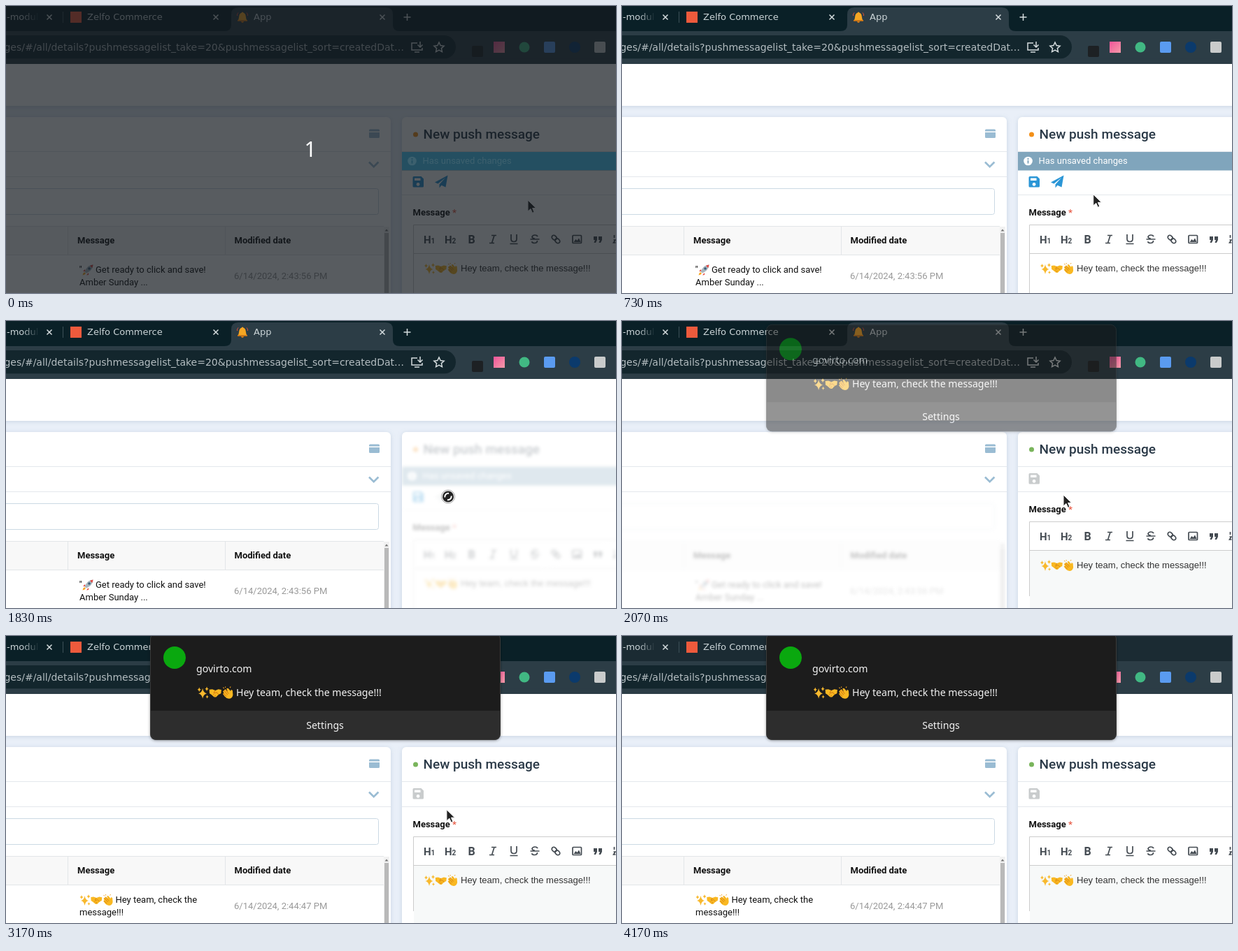
Recreate the animation shown at these times as an HTML page. Size 872 by 411 pixels, loop 4210 ms.

```html
<!DOCTYPE html>
<html lang="en">
<head>
<meta charset="utf-8">
<title>Push message</title>
<style>
  html, body { margin: 0; width: 100%; height: 100%; overflow: hidden; background: #e9eff8; }
  svg { display: block; width: 872px; height: 411px; }
  text { white-space: pre; }
  .tab { font: 13px "DejaVu Sans", sans-serif; fill: #cbd4d7; }
  .url { font: 14px "DejaVu Sans", sans-serif; fill: #b4bdc1; }
  .ui { font: 13px Roboto, sans-serif; fill: #111; }
  .bold { font: 700 13px Roboto, sans-serif; fill: #111; }
  .title { font: 500 19px Roboto, sans-serif; fill: #2b3a48; }
  .edit { font: 13px "Liberation Sans", Arial, sans-serif; fill: #333; }
  .note { font: 14.1px "Noto Sans", sans-serif; fill: #f2f2f2; }
  .tool { font: 700 15px Roboto, sans-serif; fill: #444b52; }
  .sub { font-size: 10px; }
  .x { fill: none; stroke: #d5dcde; stroke-width: 1.5; }
  .line { stroke: #e4e8ec; fill: none; }
  .ico { fill: none; stroke: #444b52; stroke-width: 1.7; }
</style>
</head>
<body>
<svg viewBox="0 0 872 411">
  <defs>
    <linearGradient id="fade" gradientUnits="userSpaceOnUse" x1="24" y1="0" x2="47" y2="0">
      <stop stop-color="#cbd4d7"/><stop offset="1" stop-color="#cbd4d7" stop-opacity="0"/>
    </linearGradient>
    <linearGradient id="pink" x2="1" y2="1">
      <stop stop-color="#f0559a"/><stop offset="1" stop-color="#f49aa8"/>
    </linearGradient>
    <filter id="soft" x="-10%" y="-10%" width="120%" height="125%">
      <feDropShadow dx="0" dy="1" stdDeviation="3" flood-color="#7d94b0" flood-opacity=".3"/>
    </filter>
    <filter id="drop" x="-5%" y="-10%" width="110%" height="125%">
      <feDropShadow dx="0" dy="1" stdDeviation="2" flood-opacity=".45"/>
    </filter>
    <clipPath id="rightClip"><rect x="566" y="159" width="320" height="270" rx="6"/></clipPath>
    <clipPath id="leftClip"><rect x="-10" y="245" width="559" height="180"/></clipPath>
    <path id="x" class="x" d="M-3.5-3.5l7 7m0-7l-7 7"/>
    <g id="sparkles" fill="#f8b92e">
      <path d="M7.5 2Q8.5 8 13 9Q8.5 10 7.5 16Q6.500 10 2 9Q6.500 8 7.500 2Z"/>
      <path d="M3 1Q3.400 3.600 5.500 4Q3.400 4.400 3 7Q2.600 4.400 .5 4Q2.600 3.600 3 1ZM13 0Q13.400 2.600 15.500 3Q13.400 3.400 13 6Q12.600 3.400 10.500 3Q12.600 2.600 13 0ZM13.500 11Q13.800 13.200 15.500 13.500Q13.800 13.800 13.500 16Q13.200 13.800 11.500 13.500Q13.200 13.200 13.500 11Z"/>
    </g>
    <g id="shake">
      <path fill="#f9b822" d="M0 4L4 3.500L8 5L12 3.500L16 4.200L15.500 9L12.500 10.500L9 14L6.500 13.800L2.500 10.500L.3 9Z"/>
      <path fill="none" stroke="#d98412" d="M8 5L6 8.200Q8 9 9.500 7.500L12.500 10.500M5 11l1.500-1.500M7 13l1.500-2"/>
    </g>
    <g id="clap">
      <path fill="#f9b822" d="M3 5L5 3.500L8 6.500L6.500 2.500L8.500 2L12 6L12.500 4L14.500 5L15 11Q14 16 9.500 16Q6.500 16 4 13L1.500 9.500L3 8.500L1.800 6.500Z"/>
      <path fill="none" stroke="#d98412" d="M3 5.200L8 11M5 3.800L9.500 9.500M2.500 9L6.500 13"/>
      <path stroke="#f0a020" d="M2 1l1.300 1.500M5 0v1.500M11 1.500l1-1.500"/>
    </g>
    <g id="trio">
      <use href="#sparkles"/><use href="#shake" x="16.300"/><use href="#clap" x="32.600"/>
    </g>
    <g id="rocket">
      <path fill="#e5433d" d="M4 7L1 10L4.500 10ZM9 12L9 15L6 15.500Z"/>
      <path fill="#a9b7bf" d="M15.500 .5Q9 1 5.500 6.500L3.500 10.500L5.800 12.500L9.500 10.500Q15 7 15.500 .5Z"/>
      <path fill="#e5433d" d="M15.500 .5L11 1.800L14.200 5Z"/>
      <circle cx="10" cy="6" r="1.800" fill="#3c5c78"/>
      <path fill="#f9a825" d="M3 11Q.8 12.500 .5 15.500Q3.500 15.200 5 13Z"/>
    </g>
    <g id="bell" stroke-linejoin="round">
      <path fill="#f6a623" d="M7 1.500Q8-.5 9.200 1.500Q12.500 2.500 12.800 7Q13 11 15 13H1Q3 11 3.200 7Q3.500 2.500 7 1.500Z"/>
      <path fill="#d97c14" d="M1 12h14v1.800H1ZM6 14h4q-.3 2-2 2t-2-2Z"/>
      <path fill="none" stroke="#e04f3d" d="M.5 6Q0 3.500 2 1.500M15.500 6Q16 3.500 14 1.500"/>
    </g>
  </defs>

  <!-- browser -->
  <rect id="strip" width="872" height="37" fill="#0a2027"/>
  <rect id="hover" x="-20" y="2" width="102" height="31" rx="8" fill="#20343c"/>
  <path d="M312 36Q322 36 322 27V12Q322 2 332 2H543Q553 2 553 12V27Q553 36 563 36Z" fill="#2c3d46"/>
  <rect y="36" width="872" height="47" fill="#2c3d46"/>
  <rect x="-40" y="42" width="683" height="33.500" rx="16.700" fill="#13262d"/>
  <text class="tab" x="1" y="20" style="fill:url(#fade)">-modul</text>
  <use href="#x" x="62" y="16"/><use href="#x" x="300" y="16"/><use href="#x" x="538" y="16"/>
  <path id="divider" d="M81.500 8v16" stroke="#3c5058"/>
  <rect x="92" y="8" width="16" height="16" fill="#ee5a3c"/>
  <text class="tab" x="116" y="20">Zelfo Commerce</text>
  <use href="#bell" x="330" y="8"/>
  <text class="tab" x="354" y="20">App</text>
  <path class="x" d="M568.500 16h10m-5-5v10"/>
  <text class="url" x="-2.600" y="64">ges/#/all/details?pushmessagelist_take=20&amp;pushmessagelist_sort=createdDat…</text>
  <path class="x" d="M588 53h-8v10h15v-3M584 66h7M592 51v8m-3.500-3.500l3.500 3.500l3.500-3.500"/>
  <path class="x" d="M619 52l2.100 4.600l5 .6l-3.700 3.400l1 5l-4.400-2.500l-4.400 2.500l1-5l-3.700-3.400l5-.6Z"/>
  <rect x="666" y="57" width="16" height="16" rx="2" fill="#1d2124"/>
  <rect x="697" y="51" width="16" height="16" fill="url(#pink)"/>
  <circle cx="741" cy="59" r="7.500" fill="#41b883"/>
  <rect x="769" y="51" width="16" height="16" rx="2" fill="#5a9bf0"/>
  <circle cx="813" cy="59" r="8" fill="#0b3a6c"/>
  <rect x="841" y="51" width="16" height="16" rx="2" fill="#c9cbcb"/>

  <!-- page -->
  <rect y="83" width="872" height="328" fill="#e9eff8"/>
  <rect x="-10" y="83" width="892" height="60" fill="#fff" filter="url(#soft)"/>
  <rect y="83" width="872" height="10" fill="#fff"/>
  <rect y="75.500" width="872" height="7.500" fill="#2c3d46"/>
  <rect x="-20" y="159" width="570" height="280" rx="6" fill="#fff" filter="url(#soft)"/>
  <rect x="566" y="159" width="330" height="280" rx="6" fill="#fff" filter="url(#soft)"/>

  <!-- list -->
  <path class="line" d="M0 208.500h550M0 244.500h550"/>
  <path d="M520.500 176.500h12q1.500 0 1.500 1.500v1.500h-15v-1.500q0-1.500 1.500-1.500ZM519 181h15v6.500q0 1.500-1.500 1.500h-12q-1.500 0-1.500-1.500Z" fill="#9abcd3"/>
  <path d="M519 223.500l6.700 6.700l6.700-6.700" fill="none" stroke="#9abcd3" stroke-width="2.700"/>
  <g clip-path="url(#leftClip)"><g id="list">
    <rect x="-10" y="261.500" width="542.500" height="37" rx="3" fill="#fff" stroke="#cbd9e4"/>
    <rect x="-10" y="316" width="550" height="40" fill="#f8f8f8"/>
    <path d="M0 315.500h540M0 356.500h540M88.500 316v40M313.500 316v40" stroke="#e3e6e8"/>
    <text class="bold" x="102" y="340">Message</text>
    <text class="bold" x="326.500" y="340">Modified date</text>
    <rect x="540" y="316" width="8" height="100" fill="#f1f1f1"/>
    <path d="M541.500 322.500l2.500-3l2.500 3Z" fill="#777"/>
    <rect x="541" y="325" width="6" height="90" fill="#b9b9b9"/>
    <g id="oldRow">
      <text class="ui" x="104.500" y="382">"</text>
      <use href="#rocket" x="109" y="370"/>
      <text class="ui" x="128" y="382">Get ready to click and save!</text>
      <text class="ui" x="105" y="400">Amber Sunday ...</text>
    </g>
    <g id="newRow">
      <use href="#trio" x="105" y="370"/>
      <text class="ui" x="156.500" y="382">Hey team, check the</text>
      <text class="ui" x="105" y="400">message!!!</text>
    </g>
    <text class="ui" id="date" x="326" y="391" style="fill:#999"></text>
  </g></g>

  <!-- details -->
  <g clip-path="url(#rightClip)"><g id="details">
    <circle id="dot" cx="585.500" cy="184" r="3.500"/>
    <text class="title" x="596.500" y="190">New push message</text>
    <path class="line" d="M566 208.500h310"/>
    <g id="banner">
      <rect x="566" y="209" width="310" height="26.500" fill="#80a5bc"/>
      <circle cx="580.500" cy="222" r="6.300" fill="#fff"/>
      <path d="M580.500 218v2M580.500 221v4.500" stroke="#80a5bc" stroke-width="2"/>
      <text class="ui" x="595.500" y="226" style="fill:#fff">Has unsaved changes</text>
    </g>
    <g id="form">
      <path id="save" fill-rule="evenodd" d="M583 244h10.500l3.500 3.500v10.500q0 1.500-1.500 1.500h-12.500q-1.500 0-1.500-1.500v-12.500q0-1.500 1.500-1.500ZM584 246.500v3.500h8.500v-3.500ZM589 253a2.400 2.400 0 1 0 .1 0Z"/>
      <path id="send" d="M631.500 242.500L613 252.500L617.500 254.500L628 246L619.500 255.500V260.500L622.500 256.800L628.500 259.500Z"/>
      <path class="line" d="M566 270.500h310"/>
      <text class="bold" x="581.500" y="300">Message <tspan style="fill:#e8604c">*</tspan></text>
      <path d="M880 313.500H582.500V420" fill="#fff" stroke="#ccc"/>
      <rect id="area" x="583" y="355" width="300" height="100"/>
      <path d="M583 354.500h300" stroke="#ccc"/>
      <text class="tool" x="597" y="339.500">H<tspan class="sub">1</tspan></text>
      <text class="tool" x="627" y="339.500">H<tspan class="sub">2</tspan></text>
      <text class="tool" x="660.500" y="339.500" style="font-size:16px">B</text>
      <path class="ico" d="M694 328.500h7M691 339.500h7M698 328.500l-3.500 11"/>
      <path class="ico" d="M722 327v6.500q0 4 4 4t4-4V327M720.500 340.500h11"/>
      <path class="ico" d="M760 330q-1-2-4-2t-4 2.500q0 2 4 2.800M749.500 334h13M759.500 336q0 3.500-4 3.500q-3 0-4-2.200"/>
      <g class="ico" transform="translate(786 334) rotate(45)">
        <rect x="-7" y="-2.800" width="7.500" height="5.600" rx="2.800"/><rect x="-.5" y="-2.800" width="7.500" height="5.600" rx="2.800"/>
      </g>
      <rect class="ico" x="810" y="328.500" width="12.500" height="11" rx="1"/>
      <path d="M811.500 338l3-4l2 2l2.500-3.500l2.500 5.500Z" fill="#444b52"/>
      <path d="M840 330h5v5l-2 4h-2.500l1.500-4h-2ZM847 330h5v5l-2 4h-2.500l1.500-4h-2Z" fill="#444b52"/>
      <path class="ico" d="M869.500 328v4M868.500 335h2.500l-2.500 4h3"/>
      <use href="#trio" x="597.500" y="368"/>
      <text class="edit" x="650" y="380">Hey team, check the message!!!</text>
    </g>
  </g></g>

  <!-- notification -->
  <g id="note">
    <rect x="206.500" y="-4" width="500" height="152.500" rx="8" fill="#1c1c1c" filter="url(#drop)"/>
    <path d="M206.500 107h500v33.500q0 8-8 8h-484q-8 0-8-8Z" fill="#2d2d2d"/>
    <rect x="206.500" y="-4" width="500" height="152.500" rx="8" fill="none" stroke="#3a3a3a"/>
    <circle cx="241" cy="31" r="16" fill="#0aa80f"/>
    <text class="note" x="272" y="52">govirto.com</text>
    <use href="#trio" transform="translate(273 72.500) scale(1.080)"/>
    <text class="note" x="329" y="86">Hey team, check the message!!!</text>
    <text class="note" x="456" y="133" text-anchor="middle">Settings</text>
  </g>

  <!-- pointers -->
  <g id="arrow"><path d="M0 0V16L4 12.500L6.500 18.300L9 17.200L6.600 11.500H11.700Z" fill="#222" stroke="#fff"/></g>
  <g id="hand"><path d="M-1.500 .5Q0-1 1.500 .5V7Q3 5.800 4.500 7.200Q6 6.300 7.300 7.800Q9 7.200 10 9V14Q10 19 5 19H2Q0 19-1.500 16.500L-5 11.500Q-5.500 9.500-3.500 9.500L-1.500 11Z" fill="#222" stroke="#fff"/></g>
  <g id="busy">
    <circle r="9.500" fill="#fff" stroke="#888" stroke-width=".8"/>
    <circle r="8" fill="#222"/>
    <g id="spin" fill="none" stroke="#fff" stroke-width="2"><path d="M-4.500 1A4.600 4.600 0 0 1 1-4.500M4.500-1A4.600 4.600 0 0 1-1 4.500"/></g>
  </g>

  <!-- countdown -->
  <g id="count">
    <rect width="872" height="411" fill="#141a20" fill-opacity=".71"/>
    <rect x="566" y="209" width="306" height="26" fill="#0a6788" fill-opacity=".35"/>
    <text x="435" y="216" text-anchor="middle" style="font:30px 'Noto Sans',sans-serif;fill:#fff">1</text>
  </g>
</svg>
<script>
const LOOP = 4210, SAVED = 1870, LISTED = 2150;
const el = {};
document.querySelectorAll('[id]').forEach(e => el[e.id] = e);

// [time, x, y]
const path = [
  [570, 746, 278], [640, 722, 277], [730, 674, 270], [850, 642, 252], [970, 634, 247],
  [1130, 634, 247], [1170, 632, 248], [1870, 631, 249],
  [3170, 631, 249], [3270, 520, 212], [3370, 250, 122], [3450, 80, 45], [3530, 11, 18],
  [3670, 3, 9], [3700, -3, 5], [3770, -20, -20]
];

const clamp = v => Math.max(0, Math.min(1, v));
const ramp = (t, a, b) => clamp((t - a) / (b - a));
const show = (e, on) => e.style.display = on ? '' : 'none';
const move = (e, x, y) => e.setAttribute('transform', `translate(${x} ${y})`);
const backOut = p => 1 + 2.70158 * (p - 1) ** 3 + 1.70158 * (p - 1) ** 2;

function pointer(t) {
  const i = path.findIndex(k => k[0] > t);
  if (i === 0) return path[0].slice(1);
  if (i < 0) return path[path.length - 1].slice(1);
  const [a, ax, ay] = path[i - 1], [b, bx, by] = path[i];
  const p = ramp(t, a, b);
  return [ax + (bx - ax) * p, ay + (by - ay) * p];
}

function load(e, p) {
  e.style.opacity = 1 - .75 * p;
  e.style.filter = p ? `blur(${2 * p}px)` : 'none';
}

function draw(t) {
  const saved = t >= SAVED, listed = t >= LISTED;
  const over = t >= 900 && t < 1430, busy = t >= 1430 && !saved;

  show(el.count, t < 30);
  el.strip.setAttribute('fill', t >= 4170 ? '#1b2b33' : '#0a2027');
  const hover = ramp(t, 3480, 3530) * (1 - ramp(t, 3690, 3770));
  el.hover.style.opacity = hover * .3;
  el.divider.style.opacity = 1 - hover;

  load(el.details, saved ? 0 : ramp(t, 1430, 1650));
  show(el.banner, !saved);
  show(el.send, !saved);
  move(el.form, 0, saved ? -26 : 0);
  el.dot.setAttribute('fill', saved ? '#7ab55c' : '#f39019');
  el.save.setAttribute('fill', saved ? '#c9cccd' : '#2b96d6');
  el.send.setAttribute('fill', busy ? '#d5dade' : over ? '#1d74aa' : '#2b96d6');
  el.area.setAttribute('fill', saved ? '#f7f9f9' : '#fff');

  load(el.list, saved ? 1 - ramp(t, 2100, 2200) : 0);
  show(el.oldRow, !listed);
  show(el.newRow, listed);
  el.date.textContent = listed ? '6/14/2024, 2:44:47 PM' : '6/14/2024, 2:43:56 PM';

  const p = ramp(t, 1970, 2170);
  show(el.note, t >= 2000);
  el.note.style.opacity = p;
  move(el.note, 0, 104 * (backOut(p) - 1));

  const [x, y] = pointer(t);
  show(el.arrow, !over && !busy && t < 3770);
  show(el.hand, over);
  show(el.busy, busy);
  move(el.arrow, x, y);
  move(el.hand, x, y);
  move(el.busy, 632, 251.5);
  el.spin.setAttribute('transform', `rotate(${(t - 1830) * .5})`);
}

const start = performance.now();
function tick() {
  draw((performance.now() - start) % LOOP);
  requestAnimationFrame(tick);
}
tick();
</script>
</body>
</html>
```
